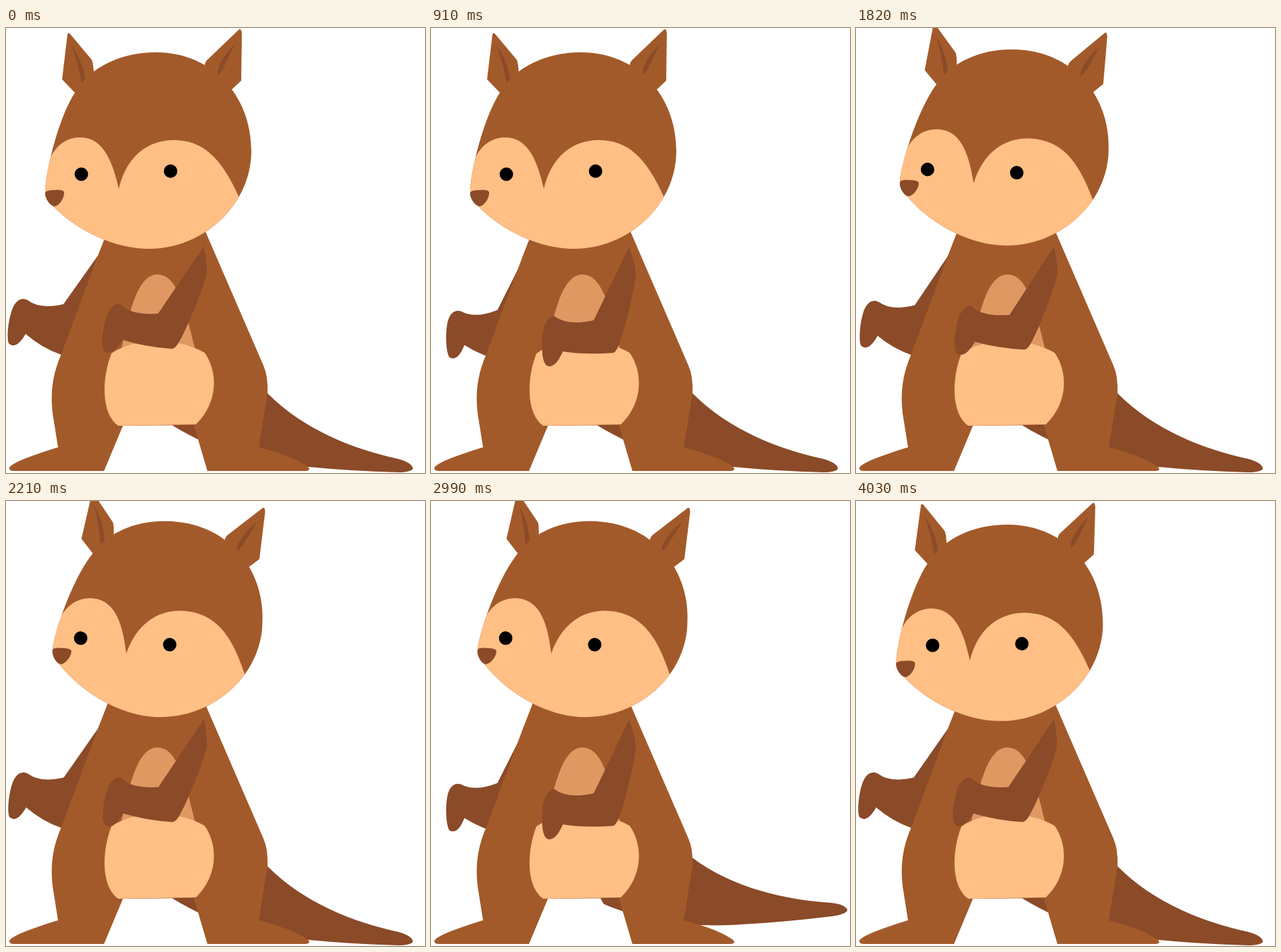
Recreate the animation shown at these times as an HTML page with a canvas. Size 620 by 659 pixels, loop 4160 ms.

```html
<!DOCTYPE html>
<html lang="en">
<head>
<meta charset="utf-8">
<title>Marsupial looking around</title>
<style>
  html, body { margin: 0; width: 100%; height: 100%; overflow: hidden; background: #fff; }
  canvas { display: block; }
</style>
</head>
<body>
<canvas id="stage" width="620" height="659"></canvas>
<script>
const ctx = document.getElementById('stage').getContext('2d');
const LOOP = 4160, STEP = 130;

const FUR = '#a35a2a', DARK = '#8b4a28', CREAM = '#ffbf85', CHEST = '#df9862';

const shape = {
  tail: 'M330 470Q360 515 387 541C440 595 515 624 580 638Q602 644 602 653Q598 658 580 658Q510 656 448 650C380 645 310 628 247 589L240 570Z',
  backArm: 'M148 320L85 409Q50 417 32 403C20 397 12 407 8 420C3 436 1 458 4 467C11 474 20 469 29 453Q53 474 82 484L112 488L150 400Z',
  body: 'M155 288L145 314L136 337L81 485C66 520 66 550 70 577L77 621C50 629 9 643 5 651Q4 656 12 656L145 656L173 589L278 588L298 656L444 656Q452 655 447 650Q425 634 374 621L387 541Q388 516 381 500L288 285Z',
  chest: 'M168 485C180 440 190 365 224 365C255 365 266 420 281 480Z',
  belly: 'M166 589C141 572 141 520 156 482C190 458 255 458 294 481C314 510 314 555 281 587Z',
  frontArm: 'M293 323Q299 355 296 368C290 390 268 445 256 465Q250 476 244 475Q205 472 173 462C166 472 160 481 150 481C139 479 142 455 146 438C150 418 160 406 169 409Q186 426 225 423Z',
  leftEar: 'M91 9Q92 6 95 9L126 46Q129 49 130 68L130 90L104 98L83 76Z',
  leftEarFold: 'M97 25Q115 55 117 74Q115 82 112 82Q108 58 97 25Z',
  rightEar: 'M344 3Q348 -1 349 8L348 78L332 93L294 64Q293 52 297 48Z',
  rightEarFold: 'M339 24C325 36 313 55 313 69C320 68 325 50 339 24Z',
  head: 'M58 240C60 205 79 130 103 94C125 58 170 36 222 36C305 36 363 100 363 182C363 262 292 327 212 327C160 327 105 300 70 264Q57 256 58 240Z',
  face: 'M40 205L61 205C70 172 92 162 110 162C145 162 158 200 167 238C178 190 210 166 248 166C290 166 318 190 345 251L345 340L40 340Z',
  nose: 'M58 244Q59 240 72 240Q86 239 86 244C86 254 77 264 72 264C66 264 57 252 58 244Z'
};
for (const key in shape) shape[key] = new Path2D(shape[key]);

function fill(name, color) {
  ctx.fillStyle = color;
  ctx.fill(shape[name]);
}

// Draws around a pivot; positive degrees turn clockwise.
function turned(x, y, degrees, draw) {
  ctx.save();
  ctx.translate(x, y);
  ctx.rotate(degrees * Math.PI / 180);
  ctx.translate(-x, -y);
  draw();
  ctx.restore();
}

function eye(x, y) {
  ctx.beginPath();
  ctx.arc(x, y, 10, 0, Math.PI * 2);
  ctx.fillStyle = '#000';
  ctx.fill();
}

function ease(t, from, to) {
  const p = Math.min(1, Math.max(0, (t - from) / (to - from)));
  return (1 - Math.cos(Math.PI * p)) / 2;
}

function drawHead(look) {
  fill('leftEar', FUR);
  fill('rightEar', FUR);
  fill('leftEarFold', DARK);
  fill('rightEarFold', DARK);
  fill('head', FUR);
  ctx.save();
  ctx.clip(shape.head);
  fill('face', CREAM);
  ctx.restore();
  fill('nose', DARK);
  eye(111.5 - 14 * look, 216.5 + 6 * look);
  eye(243.5 - 14 * look, 212 + 6 * look);
}

function draw(t) {
  const arm = -4.45 * (1 - Math.cos(2 * Math.PI * t / 2080));
  const tilt = 6.1 * (ease(t, 1440, 2070) - ease(t, 3640, 4160));
  const look = ease(t, 1040, 1430) - ease(t, 3560, 3980);
  const wag = -10 * (ease(t, 2496, 2896) - ease(t, 2896, 3296));

  ctx.fillStyle = '#fff';
  ctx.fillRect(0, 0, 620, 659);
  turned(303, 537, wag, () => fill('tail', DARK));
  turned(150, 325, arm, () => fill('backArm', DARK));
  fill('body', FUR);
  fill('chest', CHEST);
  fill('belly', CREAM);
  turned(298, 322, arm, () => fill('frontArm', DARK));
  turned(286, 335, tilt, () => drawHead(look));
}

const start = performance.now();
function tick() {
  const t = (performance.now() - start) % LOOP;
  draw(Math.floor(t / STEP) * STEP);
  requestAnimationFrame(tick);
}
tick();
</script>
</body>
</html>
```
